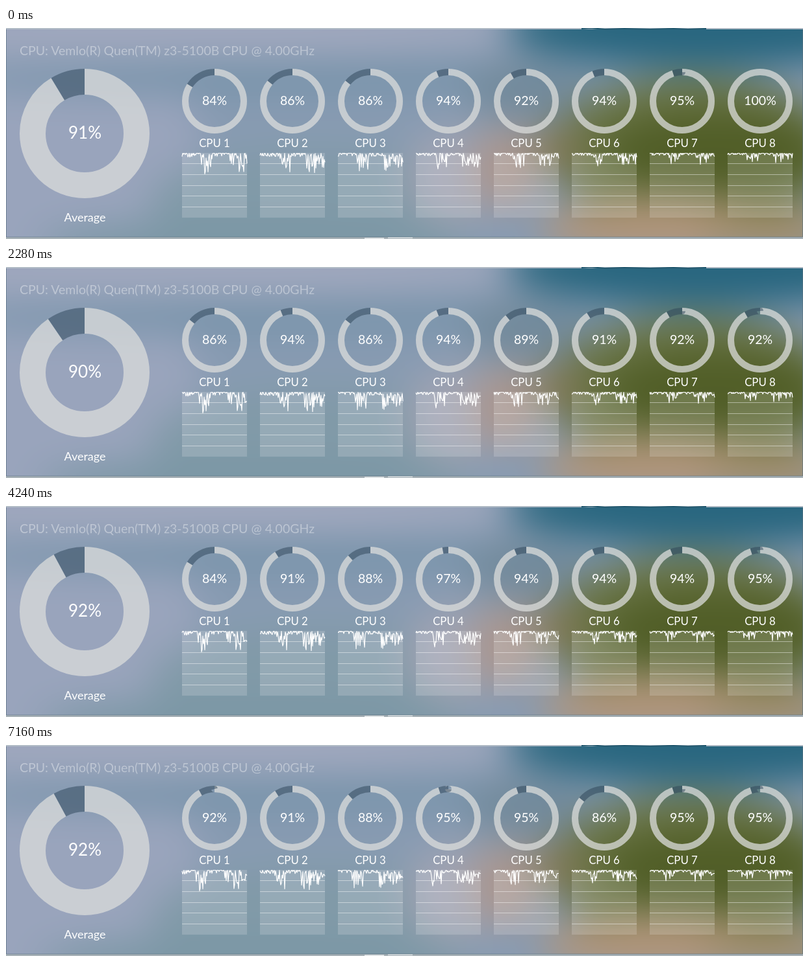
Animation of 1227 by 326 pixels, one loop 8 s. Source, as an HTML page:

```html
<!DOCTYPE html>
<html lang="en">
<head>
<meta charset="utf-8">
<title>CPU meter</title>
<style>
html, body { margin: 0; width: 100%; height: 100%; overflow: hidden; background: #8c9db5; }
svg { display: block; width: 1227px; height: 326px; }
text { font-family: Lato, "Open Sans", sans-serif; fill: #fff; text-anchor: middle; }
.title { font-size: 19.5px; text-anchor: start; fill-opacity: .38; }
.big { font-size: 26px; }
.mid { font-size: 19.5px; }
.label { font-size: 16.8px; }
.avg { font-size: 18px; }
.ring { fill: none; stroke: rgba(220, 221, 220, .74); }
.gap { fill: none; stroke: rgba(45, 68, 88, .5); }
.plot { fill: #fff; fill-opacity: .16; }
.grid { stroke: #fff; stroke-opacity: .45; }
.line { fill: none; stroke: #fff; stroke-width: 1.2; stroke-linejoin: round; }
#photo { filter: blur(28px); }
</style>
</head>
<body>
<svg viewBox="0 0 1227 326">
  <g id="photo">
    <rect x="-100" y="-100" width="1430" height="530" fill="#889bb2"/>
    <ellipse cx="60" cy="200" rx="240" ry="240" fill="#99a4bc"/>
    <ellipse cx="330" cy="0" rx="480" ry="48" fill="#a0a8be"/>
    <ellipse cx="400" cy="76" rx="520" ry="24" fill="#7592a9"/>
    <ellipse cx="480" cy="270" rx="260" ry="85" fill="#819aa8"/>
    <ellipse cx="380" cy="335" rx="330" ry="40" fill="#7b97a5"/>
    <ellipse cx="690" cy="230" rx="75" ry="75" fill="#a0a3b2"/>
    <ellipse cx="1060" cy="190" rx="225" ry="115" fill="#687344"/>
    <ellipse cx="1090" cy="190" rx="170" ry="60" fill="#515e27"/>
    <ellipse cx="770" cy="215" rx="55" ry="65" fill="#a9968f"/>
    <ellipse cx="850" cy="185" rx="40" ry="40" fill="#7f7855"/>
    <ellipse cx="1010" cy="310" rx="190" ry="46" fill="#b0957a"/>
    <ellipse cx="1180" cy="315" rx="110" ry="36" fill="#a28e6c"/>
    <ellipse cx="800" cy="95" rx="90" ry="42" fill="#71899a"/>
    <ellipse cx="1080" cy="0" rx="310" ry="62" fill="#28667f"/>
  </g>
  <g fill="none">
    <path d="M0 1H1227" stroke="#b4bec8" stroke-width="2"/>
    <path d="M886 1l14 -1 22 2 30 -1 40 1 36 -1 22 1 28 -1" stroke="#245a70" stroke-width="2"/>
    <path d="M0 324.5H1227" stroke="#a9b3b8" stroke-width="3"/>
    <path d="M552 325h30m6 -1h38" stroke="#dfe3e5" stroke-width="2"/>
    <path d="M.5 2V323H1226.5V2" stroke="#59707f" stroke-opacity=".6"/>
  </g>
  <text class="title" x="21" y="42">CPU: Vemlo(R) Quen(TM) z3-5100B CPU @ 4.00GHz</text>
  <text class="avg" x="121.5" y="299">Average</text>
  <g id="meters"></g>
</svg>
<script>
const LOOP = 8000;
const PERIOD = 980, FIRST = 310;

// Displayed load of the eight cores after each update
const loads = [
  [84, 86, 86, 94, 92, 94, 95, 100],
  [86, 97, 98, 94, 91, 97, 97, 98],
  [86, 94, 86, 94, 89, 91, 92, 92],
  [86, 89, 94, 88, 88, 91, 94, 98],
  [84, 91, 88, 97, 94, 94, 94, 95],
  [94, 94, 91, 95, 95, 91, 95, 97],
  [92, 91, 88, 95, 95, 86, 95, 95]
];
const between = (a, b) => a.map((v, i) => Math.round((v + b[i]) / 2));
loads.splice(6, 0, between(loads[5], loads[6]));
loads.splice(1, 0, between(loads[0], loads[1]));

const random = n => {
  const v = Math.sin(n * 12.9898) * 43758.5453;
  return v - Math.floor(v);
};

// Unused capacity at sample i: two busy spells with deep dips, light noise elsewhere
function idle(core, i) {
  if (i >= 100) return 100 - loads[i - 100][core];
  const r = random(core * 131 + i + 1);
  const busy = i > 29 && i < 48 || i > 70;
  const reach = 33 - core * 2.6;
  return busy ? r * r * reach : Math.max(0, r - .4) * reach * .3;
}

function ring(x, y, r, width, load) {
  const at = `cx="${x}" cy="${y}" r="${r}" stroke-width="${width}" pathLength="100" transform="rotate(-90 ${x} ${y})"`;
  const rest = 100 - load;
  return `<circle class="ring" ${at} stroke-dasharray="${load} ${rest}"/>`
    + `<circle class="gap" ${at} stroke-dasharray="${rest} ${load}" stroke-dashoffset="${-load}"/>`;
}

const label = (cls, x, y, s) => `<text class="${cls}" x="${x}" y="${y}">${s}</text>`;

function meter(load, core, step) {
  const left = 271 + core * 120, mid = left + 50;
  let grid = '', points = '';
  for (let k = 1; k < 6; k++) grid += `M${left} ${Math.round(192.6 + k * 16.7) + .5}h100`;
  for (let x = 0; x <= 100; x++) points += `${left + x},${193.5 + idle(core, x + step)} `;
  return ring(mid, 113, 45, 10, load)
    + label('mid', mid, 119, load + '%')
    + label('label', mid, 184, 'CPU ' + (core + 1))
    + `<rect class="plot" x="${left}" y="193" width="100" height="100"/>`
    + `<path class="grid" d="${grid}"/><polyline class="line" points="${points}"/>`;
}

function draw(step) {
  const now = loads[step];
  const mean = now.reduce((a, b) => a + b) / now.length;
  document.getElementById('meters').innerHTML =
    ring(121, 163, 80, 40, mean)
    + label('big', 121.5, 171, Math.round(mean - .01) + '%')
    + now.map((load, core) => meter(load, core, step)).join('');
}

// Updates fall on the 40 ms tick at or after each period
function stepAt(t) {
  let step = 0;
  while (step < loads.length - 1 && t >= Math.floor((FIRST + step * PERIOD) / 40 + .5) * 40) step++;
  return step;
}

let shown = -1;
function tick() {
  const step = stepAt(performance.now() % LOOP);
  if (step !== shown) draw(shown = step);
  requestAnimationFrame(tick);
}
tick();
</script>
</body>
</html>
```
